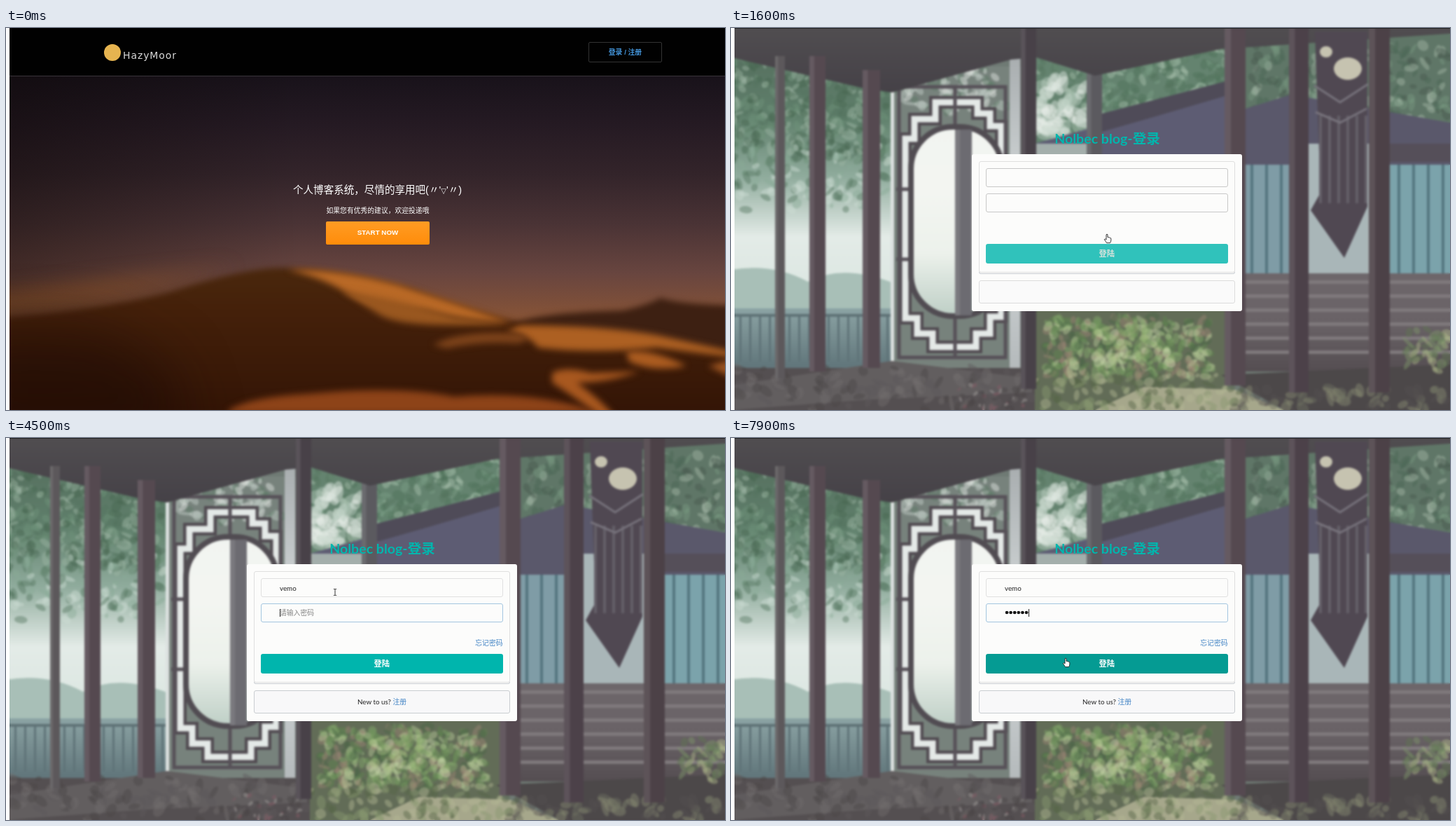
Recreate the animation shown at these times as an HTML page with a canvas. Size 1027 by 545 pixels, loop 8000 ms.

```html
<!DOCTYPE html>
<html lang="zh">
<head>
<meta charset="utf-8">
<style>
html, body { margin: 0; width: 100%; height: 100%; overflow: hidden; background: #fff; }
body { position: relative; font: 9.8px/20px Lato, "Noto Sans CJK SC", "Noto Sans CJK", sans-serif; color: #222; }
body *, canvas { box-sizing: border-box; }
.scene, canvas { position: absolute; left: 0; top: 0; width: 1027px; height: 545px; }
.scene > * { position: absolute; white-space: nowrap; }
.mid { text-align: center; left: 0; width: 1062px; }

#home { font-family: "Liberation Sans", "Noto Sans CJK SC", "Noto Sans CJK", sans-serif; color: #fff; }
#bar { left: 5px; top: 0; width: 1022px; height: 69px; background: #010101; border-bottom: 1px solid #39343a; }
#mark { left: 140px; top: 23px; width: 24px; height: 24px; border-radius: 50%; background: #e6b450; }
#brand { left: 167px; top: 29px; font: 14px/20px "DejaVu Sans", sans-serif; letter-spacing: .9px; color: #d8d8d8; }
#enter { left: 832px; top: 20px; width: 105px; height: 29px; border: 1px solid #333; border-radius: 2px;
  font-weight: bold; line-height: 27px; text-align: center; color: #4496dc; }
#lead { left: 410px; top: 221px; font-size: 14.55px; font-weight: 300; }
#lead small { font: 10px "DejaVu Sans", sans-serif; }
#hint { top: 251px; }
#start { left: 457px; top: 276px; width: 148px; height: 33px; border-radius: 2px; font-weight: bold;
  line-height: 32px; text-align: center; }

#title { left: 344px; width: 387px; top: 148px; text-align: center; font-size: 19.6px; font-weight: bold; color: #00b5ad; }
#card { left: 343.5px; top: 179.5px; width: 386.5px; height: 224px; border-radius: 3px; background: #fcfcfb; }
#form { left: 354px; top: 190px; width: 366px; height: 159px; border: 1px solid #dfdfdf; border-radius: 3px;
  box-shadow: 0 2px 0 -1px #fcfcfb, 0 2px 0 #c9cdd2; }
.field { left: 364px; width: 346px; height: 27px; border: 1px solid; border-radius: 3px; padding-left: 26px;
  display: flex; align-items: center; }
.field i { width: 1px; height: 11px; margin-right: -1px; background: #222; }
.field em { font-style: normal; }
#user { top: 200px; }
#pass { top: 235.5px; }
#pass span { height: 6px; background: radial-gradient(circle at 3px 3px, #111 2px, transparent 2.6px) 0 0 / 5.6px 6px; }
#forgot { right: 317.5px; top: 282px; color: #4183c4; }
#login { left: 364px; top: 308px; width: 345.5px; height: 28.3px; border-radius: 3px; text-align: center;
  font-size: 11.2px; font-weight: bold; line-height: 28px; }
#join { left: 354px; top: 360px; width: 366px; height: 33px; border: 1px solid #c9cdd1; border-radius: 3px;
  line-height: 31px; text-align: center; }
#join b { font-weight: normal; color: #4183c4; }
#list { left: 364px; top: 226.5px; width: 134px; padding: 5.5px 8px; border-radius: 0 0 3px 3px; background: #fcfcfc;
  box-shadow: 0 1px 3px #0007; font: 9.2px/24.85px "Open Sans", "Noto Sans", sans-serif; }
#cursor { position: absolute; left: 0; top: 0; width: 20px; height: 20px; overflow: visible; }
</style>
</head>
<body>
<div class="scene" id="home">
  <canvas id="desert" width="1027" height="545"></canvas>
  <div id="bar"></div><div id="mark"></div><div id="brand">HazyMoor</div>
  <div id="enter">登录 / 注册</div>
  <div id="lead">个人博客系统，尽情的享用吧<span>(〃'<small>▽</small>'〃)</span></div>
  <div id="hint" class="mid">如果您有优秀的建议，欢迎投递哦</div>
  <div id="start">START NOW</div>
</div>
<div class="scene" id="sign">
  <canvas id="garden" width="1027" height="545"></canvas>
  <div id="title">Nolbec blog-登录</div>
  <div id="card"></div><div id="form"></div>
  <div class="field" id="user"><span></span><i></i><em>请输入用户名</em></div>
  <div class="field" id="pass"><span></span><i></i><em>请输入密码</em></div>
  <div id="forgot">忘记密码</div>
  <div id="login">登陆</div>
  <div id="join"><span>New to us? <b>注册</b></span></div>
  <div id="list"></div>
</div>
<svg id="cursor">
  <path id="arrow" d="M0 0V11.5L2.7 9 4.5 13 6.3 12.2 4.6 8.3H8.2Z" fill="#fff" stroke="#222" stroke-width=".8"/>
  <path id="hand" d="M-1 7V.8Q0-.6 1 .8V4.5Q2.2 3.8 2.9 5Q4 4.4 4.6 5.6Q5.8 5.2 5.8 6.8V9Q5.6 11 4.5 12.6H-.5Q-1.5 10.5-3.8 7.8Q-3.2 5.8-1 8Z" fill="#fff" stroke="#222" stroke-width=".9"/>
  <path id="beam" d="M-2-4.5H-.5L0-4 .5-4.5H2M0-4V4M-2 4.5H-.5L0 4 .5 4.5H2" fill="none" stroke="#333"/>
</svg>
<script>
const $ = id => document.getElementById(id);
const names = ["Nolbec", "40817365", "nolbec", "vemo", "57309641", "gkg:''''''''"];

// ---- scenery ----
let seed = 7;
const rnd = () => (seed = seed * 16807 % 2147483647) / 2147483647;

function painter(id) {
  const c = $(id).getContext('2d');
  const ramp = (y0, y1, ...cols) => {
    const g = c.createLinearGradient(0, y0, 0, y1);
    cols.forEach((col, i) => g.addColorStop(i / (cols.length - 1), col));
    return g;
  };
  const rect = (col, x, y, w, h) => { c.fillStyle = col; c.fillRect(x, y, w, h); };
  const shape = (col, d) => { c.fillStyle = col; c.fill(new Path2D(d)); };
  const line = (col, w, d) => { c.strokeStyle = col; c.lineWidth = w; c.stroke(new Path2D(d)); };
  const blobs = (n, x, y, w, h, size, ...cols) => {
    c.globalAlpha = .45;
    for (let i = 0; i < n; i++) {
      c.fillStyle = cols[i % cols.length];
      c.beginPath();
      c.ellipse(x + rnd() * w, y + rnd() * h, size * (.4 + rnd()), size * (.3 + rnd() * .6), rnd() * 3, 0, 7);
      c.fill();
    }
    c.globalAlpha = 1;
  };
  const blur = px => c.filter = px ? `blur(${px}px)` : 'none';
  return { c, ramp, rect, shape, line, blobs, blur };
}

function paintDesert() {
  const { c, ramp, rect, shape, blur } = painter('desert');
  rect(ramp(68, 420, '#18121a', '#251a23', '#33242a', '#4a3335', '#68453f', '#8a5536'), 0, 0, 1027, 545);
  const side = c.createLinearGradient(0, 0, 420, 0);
  side.addColorStop(0, '#0a040366');
  side.addColorStop(1, '#0a040300');
  rect(side, 0, 0, 1027, 545);
  blur(14);
  shape('#a35f2a66', 'M-30 382L150 358 330 340 150 385-30 410Z');
  blur(4);
  shape('#3d2012', 'M725 422Q760 406 880 403Q915 396 935 385Q960 394 1040 396V480H725Z');
  shape(ramp(340, 545, '#4a280d', '#44200a', '#3c1b08', '#341506'),
    'M-20 415Q130 403 230 378Q340 342 395 342Q480 344 580 372Q670 404 740 422L1040 462V560H-20Z');
  blur(40);
  shape('#1a080588', 'M-60 425L130 430 230 480 270 600H-60Z');
  blur(5);
  shape('#b96926', 'M402 345Q470 342 560 366Q660 398 722 420Q660 420 600 404Q530 404 480 374Q450 356 402 345Z');
  shape('#99571f', 'M480 375Q560 385 640 412L720 424 640 424Q560 424 535 410Z');
  shape('#ad6022', 'M735 424Q850 424 930 438L1040 462V470L930 456Q840 465 760 456Q750 440 715 432Z');
  shape('#7d431a', 'M610 452Q650 430 735 436Q755 445 730 450Q680 446 630 457Z');
  shape('#ab5c20', 'M886 462Q920 456 972 482Q925 492 890 476Z');
  shape('#a8581f', 'M780 492Q800 482 835 492L905 490Q860 506 815 506Q850 530 870 555H850Q810 525 780 506Z');
  shape('#8d4318', 'M318 545Q350 526 430 522Q560 510 640 526Q760 516 850 550H318Z');
  shape('#9c5420', 'M1003 482L1040 472V500Z');
  blur(0);
  rect('#fff', 0, 0, 5, 545);
}

function paintGarden() {
  const { c, ramp, rect, shape, line, blobs, blur } = painter('garden');
  const post = (x, w, y = 0, h = 545, col = '#554950') => {
    rect(col, x, y, w, h);
    rect('#ffffff18', x, y, w * .3, h);
  };

  // trees, mist and railing on the left
  rect('#6f7a74', 0, 0, 1027, 545);
  rect(ramp(40, 470, '#56705f', '#5f7f6b', '#8fab9c', '#e3ebe7', '#dbe6e1', '#9fb8b2'), 0, 40, 235, 440);
  blobs(420, 0, 40, 225, 150, 8, '#48664f', '#6f9279', '#9db5a5', '#55745f');
  blobs(110, 0, 170, 225, 90, 8, '#55765f', '#8aab96', '#cfddd4');
  shape('#a8bfb7', 'M0 345Q60 335 110 362Q160 335 235 365V420H0Z');
  rect(ramp(400, 480, '#8ba3a4', '#62777c'), 0, 400, 230, 85);
  for (let x = 12; x < 225; x += 14) rect('#5f7378', x, 408, 3, 68);
  rect('#5f7276', 0, 408, 230, 4);

  // trees and roof behind the middle
  rect('#64836f', 434, 20, 280, 150);
  blobs(330, 434, 25, 280, 120, 8, '#4d7058', '#7a9e84', '#a9c0ad', '#567660');
  blobs(60, 434, 75, 72, 75, 12, '#eef2ee', '#dfe8e2', '#b9cdbf');
  shape('#5d5c73', 'M434 165L560 130 730 78V330H434Z');
  shape('#4f4b58', 'M530 122L730 70V90L600 128 530 148Z');
  rect('#a3aeab', 434, 165, 75, 240);
  rect('#6b6875', 530, 185, 180, 220);
  post(508, 22, 40, 380, '#5b5a5f');

  // moon window
  rect('#77827c', 230, 55, 185, 440);
  blobs(90, 236, 58, 160, 60, 8, '#5d7a67', '#c5d1c9', '#e6ebe7');
  const ring = 'M292 106H352V122H370V140H386V412H370V436H350V455H288V436H266V414H249V158H262V130H292Z';
  line('#514b51', 18, ring);
  line('#e4e9e7', 9, ring);
  line('#575158', 5, 'M240 84H392V470H240ZM320 84V140M320 412V470M236 230H258M236 330H258');
  c.fillStyle = ramp(140, 412, '#f1f4f0', '#f3f5f1', '#ecf1eb', '#bdcec5');
  c.strokeStyle = '#514c52';
  c.lineWidth = 8;
  c.beginPath();
  c.roundRect(257, 141, 130, 270, 60);
  c.fill();
  c.stroke();
  post(320, 24, 145, 265, '#6c6b71');
  rect('#dce1e0', 228, 80, 5, 400);
  rect(ramp(30, 490, '#a6abad', '#d6dbdc', '#b4b9bb'), 398, 28, 15, 465);

  // roof, blue shutters and steps on the right
  rect('#5f7667', 735, 0, 292, 200);
  blobs(220, 735, 20, 292, 115, 8, '#4a6654', '#779a80', '#a3b9a6', '#46594e');
  shape('#5a586b', 'M735 115L800 95 1027 135V195H735Z');
  rect('#7f9ca6', 735, 195, 65, 170);
  rect('#a9b6b8', 825, 165, 90, 185);
  rect('#7ba3ab', 940, 195, 87, 155);
  rect('#554f59', 940, 165, 87, 26);
  for (let x = 742; x < 1027; x += 21) if (x < 797 || x > 940) rect('#54757f', x, 195, 4, 155);
  rect(ramp(350, 490, '#6d666a', '#696266', '#544d51'), 735, 350, 292, 140);
  for (let y = 360; y < 470; y += 20) rect('#7f797c', 735, y, 292, 5);

  // floor and garden bed
  rect('#544f51', 0, 485, 440, 60);
  shape('#625e5f', 'M0 510L230 475 430 500V520L200 530 0 545Z');
  blobs(120, 0, 485, 430, 60, 9, '#4b4648', '#716c6c', '#5d585a');
  rect('#626c57', 434, 400, 275, 145);
  shape('#a6a78b', 'M520 545L590 512 720 516 790 545Z');
  shape('#4c4849', 'M700 495L1027 480V545H790Z');
  blobs(70, 720, 515, 307, 30, 9, '#6f7062', '#55504f', '#8a8b74');
  blobs(330, 450, 412, 235, 85, 8, '#5f8550', '#86ab6c', '#b9c998', '#4b6746', '#9d8576');
  blobs(70, 520, 425, 110, 55, 8, '#a9c183', '#cdd6ac', '#7d9f64');
  blobs(110, 430, 495, 300, 50, 8, '#566548', '#8a9a70', '#b4b795');
  blobs(36, 325, 508, 100, 35, 4, '#8a5b66', '#a7a1a0', '#494548');
  blobs(40, 965, 430, 62, 60, 8, '#7f976b', '#b2bb8c', '#607653');

  // ceiling, posts and wind chime
  shape(ramp(0, 90, '#504d50', '#454147'), 'M0 0H1027V8L820 22 700 30 520 68 436 42 400 45 230 92 190 86 0 42Z');
  post(63, 14, 40, 460, '#5c585b');
  post(112, 23, 40, 450);
  post(188, 25, 60, 425);
  post(414, 22, 0, 515, '#484148');
  post(705, 30, 0, 510);
  post(797, 28, 0, 520, '#4c4149');
  shape('#504852', 'M834 5H909V255L876 328 828 260 842 235Z');
  for (let x = 840; x < 908; x += 13) rect('#645f68', x, 125, 4, 125);
  line('#77737c', 3, 'M833 82L870 106 910 80M835 120L870 135 908 115');
  shape('#c6c3b0', 'M861 58A20 16 0 1 0 901 58A20 16 0 1 0 861 58ZM841 34A9 8 0 1 0 859 34A9 8 0 1 0 841 34Z');
  post(911, 30, 0, 520, '#4c4147');

  blur(1.6);
  c.drawImage(c.canvas, 0, 0);
  blur(0);
  rect('#222', 0, 0, 1027, 1);
  rect('#fff', 0, 0, 5, 545);
}

// ---- playback ----
const show = (el, on) => el.style.visibility = on ? 'visible' : 'hidden';
const ease = p => { p = Math.max(0, Math.min(1, p)); return p * p * (3 - 2 * p); };
const between = (t, a, b) => t >= a && t < b;
const moves = [
  [200, 1100, 694, 202, 537, 294],
  [1800, 2500, 537, 294, 470, 220],
  [7000, 7900, 470, 220, 478, 314],
];

function pointer(t) {
  const [a, b, x0, y0, x1, y1] = moves.filter(m => t >= m[0]).pop() || moves[0];
  const p = ease((t - a) / (b - a));
  return [x0 + (x1 - x0) * p, y0 + (y1 - y0) * p];
}

function setField(id, focus, caret, filled, loading) {
  const el = $(id), hint = el.querySelector('em');
  el.style.borderColor = loading ? '#c8c8c8' : focus ? '#a3c6e0' : '#e0e0e0';
  el.querySelector('i').style.opacity = focus && caret ? 1 : 0;
  hint.style.color = focus ? '#858585' : '#c4c4c4';
  hint.style.display = filled || loading ? 'none' : '';
}

function render(t) {
  const home = t < 1600, loading = between(t, 1600, 1700), [x, y] = pointer(t);
  $('home').style.display = home ? '' : 'none';
  $('sign').style.display = home ? 'none' : '';

  const overStart = home && t >= 300 && x < 605 && y >= 276;
  const overLogin = t >= 7000 && y >= 308;
  $('start').style.background = between(t, 1300, 1400) ? '#ff9214'
    : overStart ? '#ff9b24' : 'linear-gradient(#ff9c24, #ff8c0a)';

  const typed = t < 3500 ? '' : t < 3800 ? names[3][0] : names[3];
  $('user').firstChild.textContent = typed;
  setField('user', between(t, 2600, 4500), !between(t, 3100, 3500), typed, loading);

  const dots = [5600, 5800, 6000, 6300, 6400, 6600].filter(k => t >= k).length;
  $('pass').firstChild.style.width = dots * 5.6 + 'px';
  setField('pass', t >= 4500, !between(t, 5000, 5400) && !between(t, 7100, 7600), dots, loading);

  $('login').style.background = loading ? '#30c2bb' : overLogin ? '#059b93' : '#00b5ad';
  $('login').style.color = loading ? '#d9e3dc' : '#fff';
  $('forgot').style.opacity = $('join').firstChild.style.opacity = loading ? 0 : 1;
  $('join').style.background = loading ? '#fafafa' : '#f8f8f9';
  $('join').style.borderColor = loading ? '#dcdcdc' : '#c9cdd1';

  const list = $('list');
  list.style.display = between(t, 2600, 3900) ? '' : 'none';
  list.style.opacity = t < 2700 ? .98 : t < 3800 ? 1 : .5;
  list.innerText = t < 3600 ? names.join('\n') : names[3];

  const overField = !home && (between(y, 200, 227) || between(y, 236, 263));
  const kind = overStart || loading || overLogin ? 'hand' : overField ? 'beam' : 'arrow';
  for (const k of ['arrow', 'hand', 'beam']) show($(k), k === kind && t >= 300);
  $('cursor').style.transform = `translate(${Math.round(x)}px, ${Math.round(y)}px)`;
}

paintDesert();
paintGarden();
let last = -1;
function tick() {
  const t = Math.floor(performance.now() % 8000 / 100) * 100;
  if (t !== last) render(last = t);
  requestAnimationFrame(tick);
}
tick();
</script>
</body>
</html>
```
